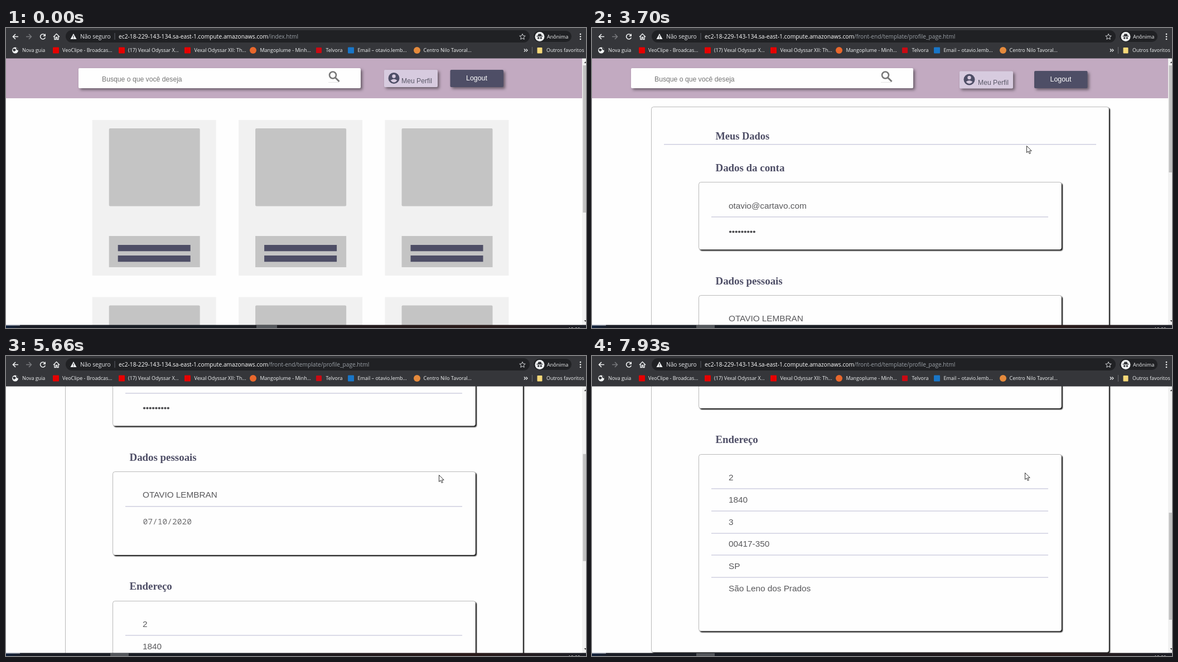
An HTML page with a canvas for the animation above (8000 ms loop, 1040x538 px).

```html
<!DOCTYPE html>
<html lang="pt-BR">
<head>
<meta charset="utf-8">
<title>Meu Perfil</title>
<style>
html, body { margin: 0; width: 100%; height: 100%; overflow: hidden; background: #fefefe; }
canvas { display: block; }
</style>
</head>
<body>
<canvas id="stage" width="1040" height="538"></canvas>
<script>
const ctx = document.getElementById('stage').getContext('2d');
const LOOP = 8000;
const UI = '"Open Sans", "Noto Sans", sans-serif';
const SANS = '"Liberation Sans", Arial, sans-serif';
const SERIF = '"Liberation Serif", "Times New Roman", serif';
const MONO = '"Noto Sans Mono", monospace';
const INK = '#4e4e66', LILAC = '#c2aac1', LINE = '#cfcfe0';
const HOST = 'ec2-18-229-143-134.sa-east-1.compute.amazonaws.com';

// Each move: start, end, number of steps, then the values reached.
const SCROLL = [
  [3850, 4260, 6, 90.75], [4560, 4870, 5, 181.5], [5260, 5660, 6, 272.2],
  [5890, 6220, 5, 363], [6700, 7080, 6, 454], [7550, 7930, 6, 535]
];
const POINTER = [
  [210, 440, 4, 973, 406], [670, 1440, 11, 733, 97], [1840, 1990, 3, 718, 97],
  [3090, 3700, 9, 779, 211], [3850, 4260, 6, 776, 213], [7160, 7310, 3, 776, 209]
];
const CLICK = 2220, LOADING = 2300, COMMIT = 2460, WAITING = 2610, READY = 2780, IDLE = 3090;

const wheelEase = x => 1.3 * x + .5 * x * x - .8 * x ** 3;
const handEase = x => x * (1.4 + .2 * x - .6 * x * x);

function follow(moves, start, t, ease) {
  let value = start;
  for (const [from, to, steps, ...goal] of moves) {
    if (t < from) break;
    const step = Math.floor((t - from) / (to - from) * (steps - 1) + .1) + 1;
    const k = ease(Math.min(1, step / steps));
    value = value.map((v, i) => v + (goal[i] - v) * k);
  }
  return value;
}

function rect(x, y, w, h, color, radius = 0) {
  ctx.fillStyle = color;
  ctx.beginPath();
  ctx.roundRect(x, y, w, h, radius);
  ctx.fill();
}

function disc(x, y, r, color) {
  ctx.fillStyle = color;
  ctx.beginPath();
  ctx.arc(x, y, r, 0, Math.PI * 2);
  ctx.fill();
}

function text(str, x, y, size, color, family = UI, weight = '') {
  ctx.font = `${weight} ${size}px ${family}`;
  ctx.fillStyle = color;
  ctx.fillText(str, x, y);
}

function path(d, color, width = 0) {
  const p = new Path2D(d);
  if (width) {
    ctx.strokeStyle = color;
    ctx.lineWidth = width;
    ctx.stroke(p);
  } else {
    ctx.fillStyle = color;
    ctx.fill(p);
  }
}

function shadowed(offset, blur, color, draw) {
  ctx.save();
  ctx.shadowOffsetX = ctx.shadowOffsetY = offset;
  ctx.shadowBlur = blur;
  ctx.shadowColor = color;
  draw();
  ctx.restore();
}

function pageHeader(searchX, profileX, profileY, logoutX, logoutY) {
  const raised = (...args) => shadowed(3, 5, 'rgba(0,0,0,.45)', () => rect(...args));
  rect(0, 54, 1033, 72, LILAC);

  raised(searchX, 72, 506, 36, '#fefefe', 2);
  text('Busque o que você deseja', searchX + 42, 96, 12.2, '#757575', SANS);
  ctx.strokeStyle = '#777';
  ctx.lineWidth = 2.6;
  ctx.beginPath();
  ctx.arc(searchX + 456, 84.5, 6, 0, Math.PI * 2);
  ctx.stroke();
  path(`M${searchX + 460.5} 89l7 7`, '#777', 3);
  rect(searchX + 448, 97, 19, 1, '#e4e4e4');

  raised(profileX, profileY, 96, 31, '#d7cbdf', 2);
  const ix = profileX + 17.5, iy = profileY + 15;
  disc(ix, iy, 10, INK);
  disc(ix, iy - 3.5, 3.2, '#d7cbdf');
  path(`M${ix - 6} ${iy + 4}q6-5 12 0q-6 7-12 0`, '#d7cbdf');
  const labelX = profileX < 670 ? 33 : 31;
  text('Meu Perfil', profileX + labelX, profileY + 24.3, 12.2, '#5b5968', SANS);

  raised(logoutX, logoutY, 95.5, 31, INK, 2);
  text('Logout', logoutX + 28.5, logoutY + 19, 12.4, '#fff', SANS);
}

function homePage() {
  pageHeader(130, 678, 75, 796.5, 75);
  for (let i = 0; i < 6; i++) {
    const x = 154.7 + (i % 3) * 262.4, y = 165 + Math.floor(i / 3) * 317.6;
    rect(x, y, 222, 279, '#f1f1f1');
    rect(x + 30, y + 15, 163, 139.5, '#c4c4c4', 2);
    rect(x + 30, y + 208, 163, 56, '#c4c4c4');
    for (const dy of [224, 243]) rect(x + 46, y + dy, 130, 11.3, INK);
  }
}

function panel(x, y, right, bottom) {
  shadowed(2, 2, 'rgba(0,0,0,.95)', () => rect(x, y, right - x, bottom - y, '#fefefe', 4));
  ctx.strokeStyle = 'rgba(0,0,0,.26)';
  ctx.lineWidth = 1;
  ctx.stroke();
}

function profilePage(loaded) {
  const heading = (str, y, size = 18.9) => text(str, 221.5, y, size, INK, SERIF, 'bold');
  const field = (str, y) => loaded && text(str, 245, y, 15.3, '#58585b', SANS);
  const rule = (y, x = 214, w = 604) => rect(x, y, w, 1.5, LINE);

  pageHeader(70, 659, 77.5, 793, 77);
  panel(106.5, 141.5, 927, 1066.5);
  heading('Meus Dados', 200, 18.4);
  rule(208, 129, 775);

  heading('Dados da conta', 257);
  panel(191.5, 276.5, 842, 397.5);
  field('otavio@cartavo.com', 324);
  rule(338);
  if (loaded) for (let i = 0; i < 9; i++) disc(248 + i * 5.35, 365.5, 2.1, '#4a4a4d');

  heading('Dados pessoais', 460);
  panel(191.5, 479.5, 842, 629);
  field('OTAVIO LEMBRAN', 526);
  rule(541);
  if (loaded) text('07/10/2020', 245.5, 574, 14.6, '#707072', MONO);

  heading('Endereço', 691);
  panel(191.5, 711.5, 842, 1028.5);
  ['2', '1840', '3', '00417-350', 'SP', 'São Leno dos Prados'].forEach((str, i) => {
    const dy = Math.round(i * 39.8);
    field(str, 758 + dy);
    if (i < 5) rule(772.3 + dy);
  });
}

function scrollbar(top, height) {
  rect(1033, 54, 7, 479, '#f1f1f1');
  rect(1034.5, top, 6, height, '#c1c1c1');
  path('M1036.5 63l2.5-3 2.5 3z', '#505050');
  path('M1036.5 524l2.5 3 2.5-3z', '#505050');
}

function bookmarks() {
  const label = (str, x) => text(str, x, 43, 8.95, '#f1f3f4');
  const square = (x, color, w = 11) => rect(x, 40 - w / 2, w, w, color, 1);
  disc(16.5, 40, 5.5, '#f1f3f4');
  path('M12 38q3-2 5 0t-1 3q-1 2-3 0zM18 35q4 1 4 5q-4 0-4-5z', '#35363a');
  label('Nova guia', 29);
  [84, 202, 320].forEach(x => square(x, '#e60000'));
  label('VeoClipe - Broadcas...', 101);
  label('(17) Vexal Odyssar X...', 219);
  label('Vexal Odyssar XII: Th...', 337.5);
  disc(443, 40, 6, '#e8672c');
  label('Mangoplume - Minh...', 455.5);
  square(556, '#c90a13', 10);
  label('Telvora', 573.5);
  square(613, '#1976c8');
  label('Email – otavio.lemb...', 630.5);
  disc(737, 40, 6, '#e58a3c');
  label('Centro Nilo Tavoral...', 748.5);
  path('M929 37.5l2.5 2.5-2.5 2.5M932.5 37.5l2.5 2.5-2.5 2.5', '#f1f3f4', 1.2);
  rect(943, 34, 1, 12, '#6b6c70');
  rect(952.5, 35, 9, 10.5, '#f6d878', 1);
  label('Outros favoritos', 969);
}

function browserBar(urlPath, loading) {
  rect(0, 0, 1040, 54.5, '#35363a');
  path('M22 15.5H12.5M17 11l-4.5 4.5 4.5 4.5', '#f1f3f4', 1.6);
  path('M36 15.5h9.5M41 11l4.5 4.5-4.5 4.5', '#77787c', 1.6);
  if (loading) {
    path('M62 11.5l8 8M70 11.5l-8 8', '#f1f3f4', 1.6);
  } else {
    path('M69.6 12.7A4.5 4.5 0 1 0 70.3 17', '#f1f3f4', 1.6);
    path('M71 10v5h-5z', '#f1f3f4');
  }
  path('M85 16l5.5-5.5L96 16M87 14.5V20.5h2.5v-4h2v4H94v-6', '#f1f3f4', 1.4);

  rect(107, 4, 832, 22, '#202124', 11);
  path('M121 10l5.5 10h-11z', '#f1f3f4');
  rect(120.4, 13.5, 1.2, 3, '#202124');
  rect(120.4, 17.5, 1.2, 1.2, '#202124');
  text('Não seguro', 133, 19, 10.2, '#e8eaed');
  rect(194.5, 9, 1, 12, '#5f6368');
  text(HOST, 202, 19, 10.25, '#fff');
  text(urlPath, 470, 19, 10.17, '#9aa0a6');
  path('M926 10.5l1.5 3.4 3.7.3-2.8 2.5.8 3.6-3.2-1.9-3.2 1.9.8-3.6-2.8-2.5 3.7-.3z', '#d5d7da', 1);

  rect(946, 5, 68, 20, '#202124', 10);
  disc(957, 15.5, 8.5, '#f1f3f4');
  path('M953.5 14l1-3.5h5l1 3.5zM951.5 14h11v1.2h-11z', '#35363a');
  disc(954.7, 18, 1.8, '#35363a');
  disc(959.3, 18, 1.8, '#35363a');
  text('Anônima', 970, 18.5, 9.1, '#f1f3f4');
  for (const y of [11, 15.5, 20]) disc(1030, y, 1.3, '#f1f3f4');
  bookmarks();
}

function taskbar(activeX, activeWidth) {
  const shade = ctx.createLinearGradient(0, 0, 1040, 0);
  [[0, '#10213c'], [.03, '#1a1c24'], [.35, '#181d24'], [.6, '#20191c'], [.8, '#2a1a19'], [1, '#1b1d25']]
    .forEach(([stop, color]) => shade.addColorStop(stop, color));
  rect(0, 532.5, 1040, 5.5, shade);
  rect(0, 532.5, 25, 1, '#d8dde6');
  rect(activeX, 533, activeWidth, 5, '#53565b');
  text('10:00', 1008, 544, 8.5, '#e8e8e8');
}

function statusBubble() {
  rect(0, 516, 347, 17, '#35363a', [0, 3, 0, 0]);
  text(`Aguardando ${HOST}...`, 4, 528, 9.8, '#bdc1c6');
}

function pointer(x, y, clicked) {
  if (clicked) {
    const glow = ctx.createRadialGradient(x, y + 2, 2, x, y + 2, 10);
    glow.addColorStop(0, 'rgba(238,226,30,.85)');
    glow.addColorStop(.7, 'rgba(238,226,60,.6)');
    glow.addColorStop(1, 'rgba(238,226,60,0)');
    disc(x, y + 2, 10, glow);
  }
  ctx.save();
  ctx.translate(x + .5, y + .5);
  const arrow = 'M0 0V12l2.8-2.5 2 4.5 2-.9-2-4.3h3.9z';
  path(arrow, '#fff');
  path(arrow, '#333', 1);
  ctx.restore();
}

function draw(t) {
  const onProfile = t >= COMMIT;
  const scroll = Math.round(follow(SCROLL, [0], t, wheelEase)[0]);
  const [x, y] = follow(POINTER, [1020, 575], t, handEase);

  rect(0, 0, 1040, 538, '#fefefe');
  ctx.save();
  ctx.translate(0, -scroll);
  if (onProfile) profilePage(t >= READY);
  else homePage();
  ctx.restore();

  if (onProfile) scrollbar(67 + scroll * .4, 192);
  else scrollbar(67, 264);
  if (t >= WAITING && t < IDLE) statusBubble();
  browserBar(onProfile ? '/front-end/template/profile_page.html' : '/index.html', t >= LOADING && t < READY);
  if (onProfile) taskbar(187, 33);
  else taskbar(449, 37);
  if (t >= POINTER[0][0]) pointer(x, y, t >= CLICK && t < LOADING);
}

function tick() {
  draw(performance.now() % LOOP);
  requestAnimationFrame(tick);
}
tick();
</script>
</body>
</html>
```
